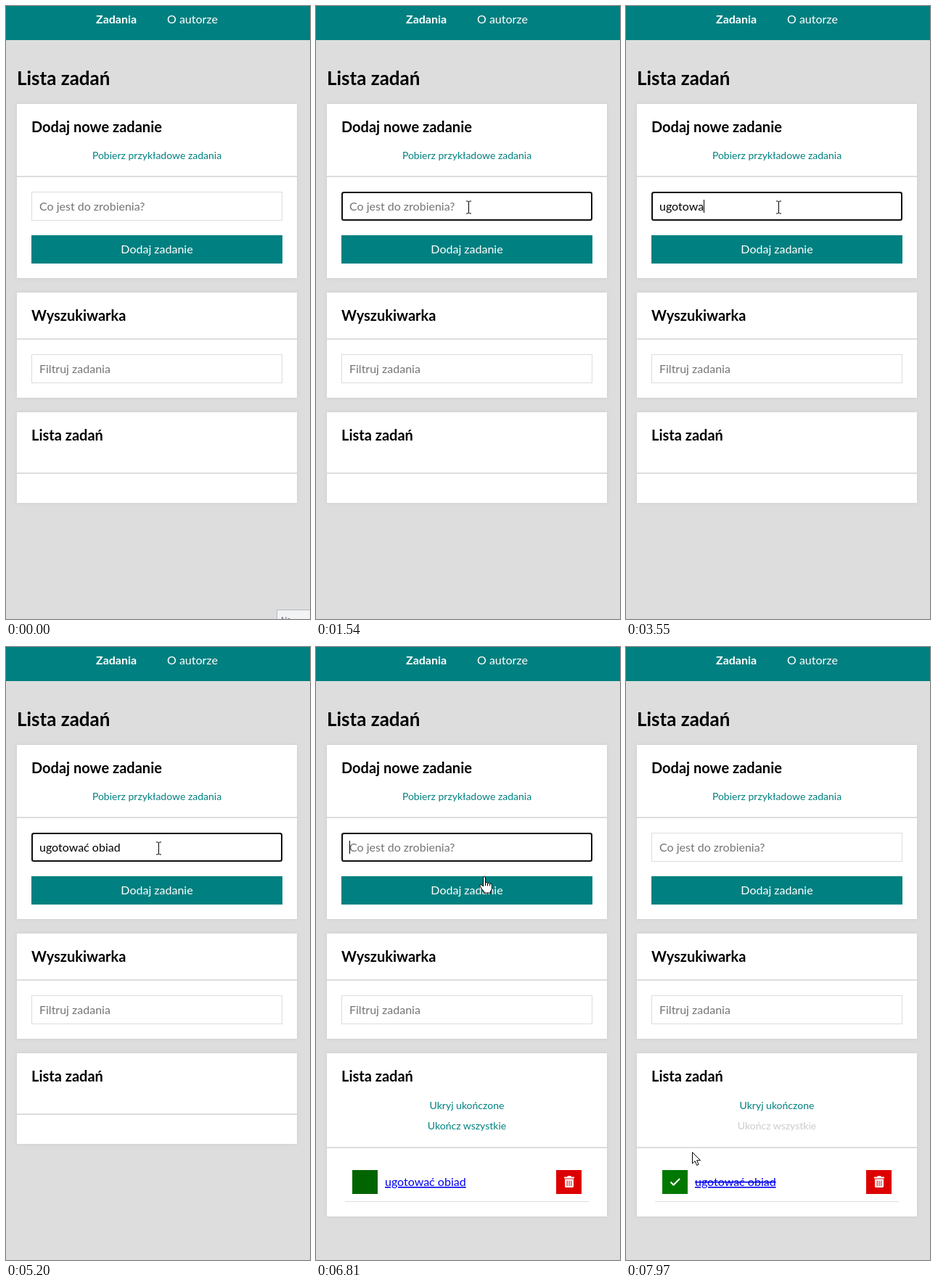
Write an HTML page that moves like this. It is 419 px wide and 845 px high and loops after 8000 ms.

```html
<!DOCTYPE html>
<html lang="pl">
<head>
<meta charset="utf-8">
<title>Lista zadań</title>
<style>
  html, body { margin: 0; width: 100%; height: 100%; overflow: hidden; background: #ddd; }
  svg { display: block; width: 100%; height: 100%; }
  text { font: 16px Lato, sans-serif; white-space: pre; }
  .mid { text-anchor: middle; }
  .h1 { font-size: 26px; font-weight: 700; }
  .h2 { font-size: 20px; font-weight: 700; }
  .link { font-size: 14px; fill: #008080; }
  .hint { fill: #757575; }
  .white { fill: #fff; }
  .card { fill: #fff; filter: drop-shadow(0 0 2px #ccc); }
  .rule { fill: #ddd; }
  .field { fill: #fff; stroke: #ddd; }
  .teal { fill: #008080; }
  .cursor { fill: #fff; stroke: #000; stroke-linejoin: round; }
  #task { fill: #00e; text-decoration: underline; }
  #task.done { text-decoration: underline line-through; }
</style>
</head>
<body>
<svg viewBox="0 0 419 845">
  <rect width="419" height="845" fill="#ddd"/>
  <rect class="teal" width="419" height="47"/>
  <text class="white" x="124" y="24" font-weight="700" style="font-weight:700">Zadania</text>
  <text class="white" x="222" y="24">O autorze</text>
  <text class="h1" x="15" y="109">Lista zadań</text>

  <rect class="card" x="15" y="135" width="386" height="240"/>
  <text class="h2" x="35" y="174">Dodaj nowe zadanie</text>
  <text class="link mid" x="208" y="211">Pobierz przykładowe zadania</text>
  <rect class="rule" x="15" y="234" width="386" height="2"/>
  <rect class="field" x="35.5" y="256.5" width="345" height="39"/>
  <rect id="focus" x="36" y="257" width="344" height="38" rx="2.5" fill="#fff" stroke="#101010" stroke-width="2"/>
  <text id="hint" class="hint" x="46" y="282">Co jest do zrobienia?</text>
  <text id="typed" x="46" y="282"></text>
  <rect id="caret" y="267" width="1" height="18"/>
  <rect class="teal" x="35" y="316" width="346" height="39"/>
  <text class="white mid" x="208" y="341">Dodaj zadanie</text>

  <rect class="card" x="15" y="395" width="386" height="145"/>
  <text class="h2" x="35" y="434">Wyszukiwarka</text>
  <rect class="rule" x="15" y="458" width="386" height="2"/>
  <rect class="field" x="35.5" y="480.5" width="345" height="39"/>
  <text class="hint" x="46" y="506">Filtruj zadania</text>

  <rect id="list" class="card" x="15" y="560" width="386" height="125"/>
  <text class="h2" x="35" y="599">Lista zadań</text>
  <rect id="listRule" class="rule" x="15" width="386" height="2"/>
  <g id="item">
    <text class="link mid" x="208" y="637">Ukryj ukończone</text>
    <text id="finishAll" class="link mid" x="208" y="665">Ukończ wszystkie</text>
    <rect id="box" x="50" y="721" width="35" height="33"/>
    <path id="check" d="M61.5 737.5l4 4 8.5-8.5" fill="none" stroke="#fff" stroke-width="2"/>
    <text id="task" x="95" y="743">ugotować obiad</text>
    <rect x="331" y="721" width="35" height="33" fill="#d00"/>
    <path class="white" d="M342 730.5h4l1-1.5h4l1 1.5h4v2h-14zM343 733.5h12v10a1.5 1.5 0 0 1-1.5 1.5h-9a1.5 1.5 0 0 1-1.5-1.5z"/>
    <path d="M346.2 735.5v7.5M349 735.5v7.5M351.8 735.5v7.5" stroke="#d00"/>
    <rect class="rule" x="40" y="764" width="336" height="1"/>
  </g>

  <g id="tip">
    <rect x="373.5" y="832.5" width="60" height="30" fill="#f1f3f4" stroke="#b4bcbc"/>
    <text x="379" y="850" fill="#667" style="font-size:11px">Na</text>
  </g>

  <path id="arrow" class="cursor" d="M.5 .5v15.5l3.6-3.4 2.5 5.9 2.5-1.1-2.5-5.7h4.9z"/>
  <g id="beam" fill="none">
    <path d="M-3.5-8.5h2.5l1 1 1-1h2.500M0-7.500V7.500M-3.500 8.500h2.500l1-1 1 1h2.500" stroke="#000" transform="translate(.5 .5)"/>
  </g>
  <path id="hand" class="cursor" d="M-1.500 1q0-1.500 1.500-1.500t1.500 1.500v7q2.500-1 3 .5 2.300-.8 3 .6 2.800-.4 2.800 2v4q0 3-1.800 4.700v2.200h-9v-2q-3.500-3.500-5.500-7.500-.5-2 1.500-2 1.500.5 3 2.500zM1.500 8v4M4.500 8.500v4M7.500 9.500v3"/>
</svg>
<script>
const LOOP = 8000, STEP = 67, BLINK = 530;
const TASK = 'ugotować obiad';
const KEY_TIMES = [2600, 2860, 3080, 3180, 3280, 3420, 3550, 3810, 3940, 4080, 4140, 4340, 4410, 4680];
const FOCUS = 1010, SUBMIT = 5470, BLUR = 7500, CHECKED = 7570;

// Pointer moves: [start, end, points spread evenly over the move]
const MOVES = [
  [270, 810, [[391, 649], [352, 545], [300, 425], [252, 322], [218, 258], [208, 242], [209, 262], [210, 277]]],
  [6740, 7360, [[213, 285], [235, 322], [247, 390], [232, 480], [190, 575], [138, 655], [92, 712], [68, 742], [64, 747]]],
  [7640, 7970, [[64, 747], [66, 741], [73, 725], [83, 708], [91, 696]]]
];

const el = id => document.getElementById(id);
const [focusRing, hint, typed, caret, list, listRule, item, finishAll, box, check, task, tip] =
  ['focus', 'hint', 'typed', 'caret', 'list', 'listRule', 'item', 'finishAll', 'box', 'check', 'task', 'tip'].map(el);
const cursors = { arrow: el('arrow'), beam: el('beam'), hand: el('hand') };
const show = (node, on) => node.setAttribute('visibility', on ? 'visible' : 'hidden');
const inside = ([x, y], left, top, right, bottom) => x >= left && x < right && y >= top && y < bottom;

function pointerAt(t) {
  const move = MOVES.filter(([start]) => t >= start).pop();
  if (!move) return null;
  const [start, end, points] = move;
  const held = t >= end ? end : start + Math.floor((t - start) / STEP) * STEP;
  const along = (held - start) / (end - start) * (points.length - 1);
  const i = Math.min(Math.floor(along), points.length - 2);
  return points[i].map((v, axis) => Math.round(v + (points[i + 1][axis] - v) * (along - i)));
}

function cursorFor(p, hasItem) {
  if (inside(p, 35, 256, 381, 296) || inside(p, 35, 480, 381, 520)) return 'beam';
  const overButton = inside(p, 35, 316, 381, 355);
  const overItem = hasItem && (inside(p, 50, 721, 85, 754) || inside(p, 154, 624, 262, 668));
  return overButton || overItem ? 'hand' : 'arrow';
}

function caretOn(t) {
  if (t < FOCUS || t >= BLUR) return false;
  if (t >= SUBMIT) return t >= 5740 && Math.floor((t - 5740) / BLINK) % 2 === 0;
  const lastKey = KEY_TIMES.filter(k => k <= t).pop() ?? FOCUS;
  return Math.floor((t - lastKey) / (lastKey === 4680 ? 520 : BLINK)) % 2 === 0;
}

function draw(t) {
  const submitted = t >= SUBMIT, done = t >= CHECKED;
  const text = submitted ? '' : TASK.slice(0, KEY_TIMES.filter(k => k <= t).length);
  show(tip, t < 70);
  show(focusRing, t >= FOCUS && t < BLUR);
  focusRing.setAttribute('stroke-opacity', t < 1090 ? .6 : 1);

  typed.textContent = text;
  show(hint, !text);
  show(caret, caretOn(t));
  caret.setAttribute('x', 46 + Math.round(text ? typed.getComputedTextLength() : 0));

  list.setAttribute('height', submitted ? 225 : 125);
  listRule.setAttribute('y', submitted ? 689 : 643);
  show(item, submitted);
  show(check, done);
  task.setAttribute('class', done ? 'done' : '');
  finishAll.style.fill = done ? '#ccc' : '';
  box.setAttribute('fill', t >= 7300 ? '#007800' : '#006400');

  const p = pointerAt(t);
  const kind = p && cursorFor(p, submitted);
  for (const [name, node] of Object.entries(cursors)) {
    show(node, name === kind);
    if (p) node.setAttribute('transform', `translate(${p})`);
  }
}

const began = performance.now();
function tick() {
  draw((performance.now() - began) % LOOP);
  requestAnimationFrame(tick);
}
tick();
</script>
</body>
</html>
```
